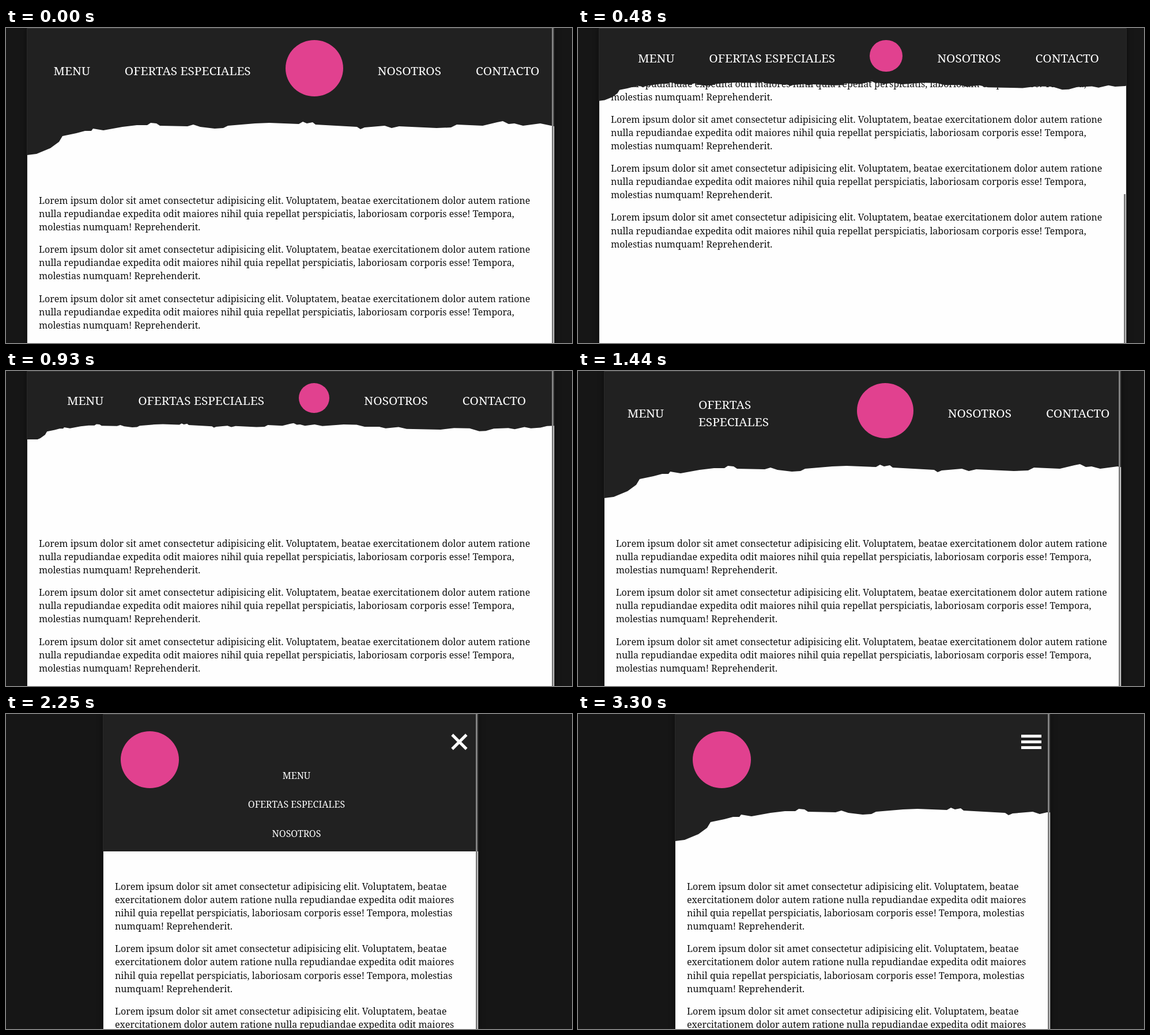
An HTML page for the animation above (3360 ms loop, 982x548 px).

```html
<!DOCTYPE html>
<html lang="es">
<head>
<meta charset="utf-8">
<title>Responsive header</title>
<style>
@property --small { syntax: "<number>"; inherits: true; initial-value: 0; }
@property --scroll { syntax: "<number>"; inherits: true; initial-value: 0; }
* { box-sizing: border-box; margin: 0; padding: 0; }
html, body { width: 100%; height: 100%; overflow: hidden; background: #161616; }
body { position: relative; font: 16px/23.1px "Noto Serif", serif; color: #111; }
ul { list-style: none; }

.page, header, .nav, .mobile, .menu, .bar {
  animation-duration: 3360ms;
  animation-iteration-count: infinite;
  animation-timing-function: linear;
}
.page {
  position: absolute; top: 0; bottom: 0; left: 37px; right: 31px;
  overflow: hidden; background: #fefefe;
  box-shadow: 0 0 0 1px #292929, 0 0 8px 1px #0d0d0d;
  animation-name: resize, scroll;
}
article {
  position: absolute; top: 289px; left: 20px; right: 16px;
  font-size: 16.03px;
  transform: translateY(calc(var(--scroll) * -397px));
}
p { margin-bottom: 16px; }
.thumb {
  position: absolute; top: calc(var(--scroll) * 289px); right: 1px;
  width: 3px; height: 766px; background: #808080;
}

header {
  position: absolute; top: 0; left: 0; right: 0;
  height: calc(222px - 104.5px * var(--small));
  color: #fff; animation-name: shrink;
}
header::after {
  content: ""; position: absolute; top: 0; left: 0; right: 0;
  height: 1px; background: #3a3a3a;
}
.paper { position: absolute; width: 100%; height: 100%; fill: #212121; }
.nav {
  position: absolute; top: 20.5px; width: 100%; padding: 0 20px 0 40px;
  display: flex; justify-content: center; align-items: center; gap: 60px;
  font-size: 20.8px; line-height: 30px; animation-name: hide;
}
.logo { border-radius: 50%; background: #e1418f; aspect-ratio: 100 / 98; }
.nav .logo {
  width: calc(100px - 47.5px * var(--small));
  min-width: 0; margin-bottom: 8px; align-self: flex-start;
}
.mobile { position: absolute; inset: 0; animation-name: show; }
.mobile .logo { position: absolute; left: 30px; top: 30px; width: 101px; }
.menu {
  position: absolute; top: 72px; width: 100%; height: 0; padding-left: 20px;
  overflow: hidden; background: #212121; text-align: center; line-height: 50.6px;
  animation-name: unfold;
}
.menu li:first-child { margin-top: 9.5px; }
.bar {
  position: absolute; right: 15px; top: 36px; width: 35px; height: 5px;
  background: #fff; animation-name: cross;
}
.bar:nth-of-type(1) { --dy: 10px; --turn: 45deg; }
.bar:nth-of-type(2) { top: 46px; animation-name: fade; }
.bar:nth-of-type(3) { top: 56px; --dy: -10px; --turn: -45deg; }

@keyframes resize {
  0%, 41.96% { left: 37px; right: 31px; }
  42.86% { left: 45px; right: 39px; }
  44.64% { left: 88px; right: 82px; }
  48.21% { left: 165px; right: 159px; }
  49.11%, 100% { left: 169px; right: 163px; }
}
@keyframes scroll {
  0%, 0.9% { --scroll: 0; animation-timing-function: ease-in-out; }
  12% { --scroll: 1; }
  17.4% { --scroll: 1; animation-timing-function: ease-in-out; }
  26.8%, 100% { --scroll: 0; }
}
@keyframes shrink {
  0%, 4.91% { --small: 0; animation-timing-function: ease; }
  19.79% { --small: 1; }
  27.23% { --small: 1; animation-timing-function: ease; }
  42.11%, 100% { --small: 0; }
}
@keyframes hide {
  0%, 46.12% { visibility: visible; }
  46.13%, 100% { visibility: hidden; }
}
@keyframes show {
  0%, 46.12% { visibility: hidden; }
  46.13%, 100% { visibility: visible; }
}
@keyframes unfold {
  0%, 62.82% { height: 0; animation-timing-function: ease; }
  71.75% { height: 218px; }
  83.04% { height: 218px; animation-timing-function: ease; }
  91.96%, 100% { height: 0; }
}
@keyframes cross {
  0%, 62.82%, 87.5%, 100% { transform: translateY(0) rotate(0deg); }
  66.5%, 83.04% { transform: translateY(var(--dy)) rotate(var(--turn)); }
}
@keyframes fade {
  0%, 62.82%, 87.5%, 100% { opacity: 1; }
  66.5%, 83.04% { opacity: 0; }
}
</style>
</head>
<body>
<div class="page">
  <article></article>
  <header>
    <svg class="paper" viewBox="0 0 1632 222" preserveAspectRatio="xMinYMin slice">
      <path d="M0 0V221L16 219 40 209 55 198 61 188 85 183 100 179 111 179 114 175 132 178 165 172 190 169
        208 169 214 165 224 166 230 170 278 171 288 168 300 172 325 175 340 174 348 170 395 166 420 165
        471 167 478 163 485 166 495 164 500 168 572 172 578 176 585 173 620 170 632 174 645 171 710 174
        735 173 745 168 790 170 815 164 825 162 835 167 845 166 860 170 890 166 914 171 980 166 1020 167
        1045 173 1090 173 1110 178 1150 174 1175 180 1280 182 1322 177 1370 178 1400 187 1420 186
        1445 179 1490 177 1510 181 1540 174 1560 178 1590 176 1610 171 1632 170V0Z"/>
    </svg>
    <ul class="nav">
      <li>MENU</li>
      <li>OFERTAS ESPECIALES</li>
      <li class="logo"></li>
      <li>NOSOTROS</li>
      <li>CONTACTO</li>
    </ul>
    <div class="mobile">
      <ul class="menu">
        <li>MENU</li>
        <li>OFERTAS ESPECIALES</li>
        <li>NOSOTROS</li>
        <li>CONTACTO</li>
      </ul>
      <span class="bar"></span>
      <span class="bar"></span>
      <span class="bar"></span>
      <div class="logo"></div>
    </div>
  </header>
  <div class="thumb"></div>
</div>
<script>
const lorem = "Lorem ipsum dolor sit amet consectetur adipisicing elit. Voluptatem, beatae " +
  "exercitationem dolor autem ratione nulla repudiandae expedita odit maiores nihil quia " +
  "repellat perspiciatis, laboriosam corporis esse! Tempora, molestias numquam! Reprehenderit.";
document.querySelector("article").innerHTML = `<p>${lorem}</p>`.repeat(6);
</script>
</body>
</html>
```
